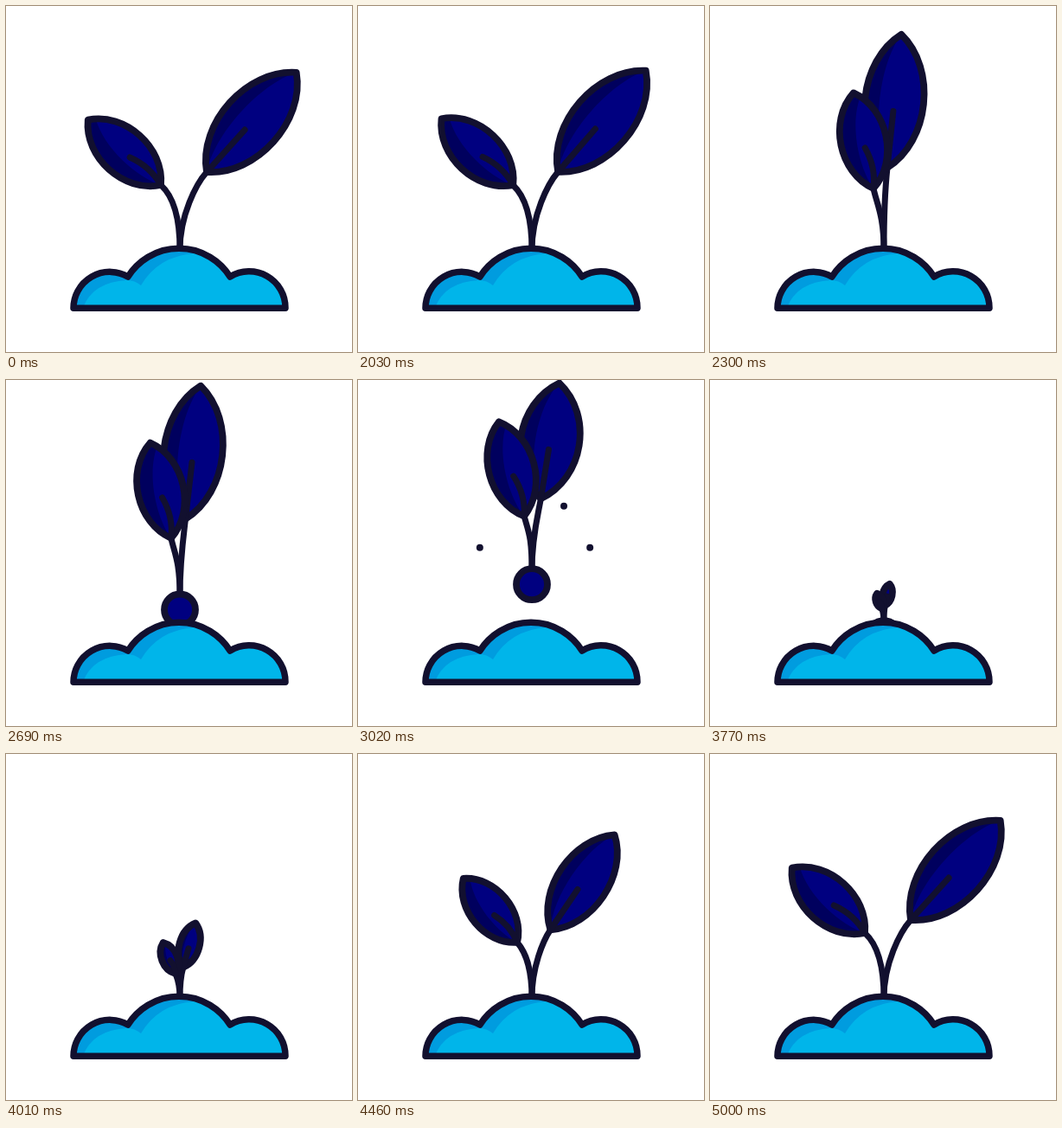
An HTML page with a canvas that plays this animation: 400 by 400 pixels, repeating every 5030 ms.

```html
<!DOCTYPE html>
<html>
<head>
<meta charset="utf-8">
<title>Sprout</title>
<style>
html, body { margin: 0; width: 100%; height: 100%; overflow: hidden; background: #fff; }
canvas { display: block; }
</style>
</head>
<body>
<canvas id="stage" width="400" height="400"></canvas>
<script>
const ctx = document.getElementById('stage').getContext('2d');
const LOOP = 5030, INK = '#12102f', NAVY = '#000080', NAVY_DARK = '#00005e';
const SKY = '#00b5ea', SKY_DARK = '#009cdf';

// Leaf base (relative to the root) and angle, each as [spread, folded]
const RIGHT = { x: [31, 4], y: [-85, -90], turn: [42, 6], len: 155, half: 34, inner: -.5, skew: 0 };
const LEFT = { x: [-22, -12], y: [-70, -66], turn: [-48.2, -11.8], len: 113, half: 26.5, inner: -.35, skew: .1 };

const ramp = (t, from, to) => Math.min(1, Math.max(0, (t - from) / (to - from)));
const smooth = (t, from, to) => { const u = ramp(t, from, to); return u * u * (3 - 2 * u); };
const mix = ([a, b], p) => a + (b - a) * p;

function pose(t) {
  const jump = ramp(t, 2500, 3780);
  const drag = Math.sin(Math.PI * ramp(t, 2500, 3600));
  const growth = 1 - (1 - ramp(t, 3830, 5000)) ** 2.5;
  return {
    rootY: 277 - 256 * jump * (1 - jump),
    fold: (smooth(t, 2000, 2300) - .17 * smooth(t, 2500, 3530)) * (1 - growth ** 2),
    squash: 1 - .13 * drag,
    lean: 4 * drag,
    scale: 1 - smooth(t, 3600, 3830) + growth
  };
}

function stroke(width, path) {
  ctx.lineWidth = width;
  ctx.strokeStyle = INK;
  path ? ctx.stroke(path) : ctx.stroke();
}

function disc(x, y, r, color) {
  ctx.beginPath();
  ctx.arc(x, y, r, 0, 2 * Math.PI);
  ctx.fillStyle = color;
  ctx.fill();
}

// Leaf pointing up from (0,0)
function drawLeaf(len, side, inner, skew) {
  const outline = new Path2D();
  outline.moveTo(0, 0);
  outline.bezierCurveTo(-side, -len * .23, -side, -len * .77, 0, -len);
  outline.bezierCurveTo(side, -len * .77, side, -len * .23, 0, 0);
  ctx.fillStyle = NAVY;
  ctx.fill(outline);

  ctx.save();
  ctx.clip(outline);
  ctx.beginPath();
  ctx.moveTo(0, 0);
  ctx.bezierCurveTo(side * inner, -len * .25, side * inner, -len * .75, skew, -len);
  ctx.lineTo(-side, -len);
  ctx.lineTo(-side, 0);
  ctx.fillStyle = NAVY_DARK;
  ctx.fill();
  ctx.restore();
  stroke(7.8, outline);

  ctx.beginPath();
  ctx.moveTo(0, 0);
  ctx.quadraticCurveTo(skew * .7, -len * .21, 0, -len * .425);
  stroke(7);
}

function branch(leaf, { rootY, fold, squash, lean, scale }) {
  const angle = mix(leaf.turn, fold) * Math.PI / 180, bend = 18 * scale;
  const x = 201 + (mix(leaf.x, fold) + lean) * scale;
  const y = rootY + mix(leaf.y, fold) * squash * scale;
  // The tip never leaves the stage
  const len = Math.min(leaf.len * scale, (y - 3.5) / Math.cos(angle));

  ctx.beginPath();
  ctx.moveTo(201, rootY + 5);
  ctx.bezierCurveTo(201, rootY - 35 * scale,
    x - Math.sin(angle) * bend, y + Math.cos(angle) * bend, x, y);
  stroke(7);

  ctx.save();
  ctx.translate(x, y);
  ctx.rotate(angle);
  drawLeaf(len, leaf.half * scale / .75, leaf.inner, leaf.skew * len);
  ctx.restore();
}

function crumbs(t) {
  const age = t - 2720;
  if (age < 0 || age > 960) return;
  const drift = 1 - Math.exp(-.002 * age);
  const crumb = (x, reach, speed, gravity) =>
    disc(x + reach * drift, 285 - speed * age + gravity * age * age, 4, INK);
  crumb(201, -133, .465, .000539);
  crumb(208, 133, .465, .000539);
  crumb(205, 73, .759, .000984);
}

const cloud = new Path2D('M78 349.3A42 42 0 0 1 141 313A69.5 69.5 0 0 1 259 313A42 42 0 0 1 323 349.3Z');
const cloudShade = new Path2D('M78 349A42 42 0 0 1 141 313A69.5 69.5 0 0 1 218 282V286Q176 289 156 323Q149 317 140 317Q100 319 89 349Z');

function draw(t) {
  const now = pose(t);
  ctx.fillStyle = '#fff';
  ctx.fillRect(0, 0, 400, 400);
  ctx.lineCap = ctx.lineJoin = 'round';

  crumbs(t);
  if (now.scale > 0) {
    branch(RIGHT, now);
    branch(LEFT, now);
  }
  if (now.rootY < 277) {
    disc(201, now.rootY + 21, 18, NAVY);
    stroke(7.8);
  }

  ctx.fillStyle = SKY;
  ctx.fill(cloud);
  ctx.fillStyle = SKY_DARK;
  ctx.fill(cloudShade);
  stroke(7.5, cloud);
}

function frame() {
  draw(performance.now() % LOOP);
  requestAnimationFrame(frame);
}
frame();
</script>
</body>
</html>
```
